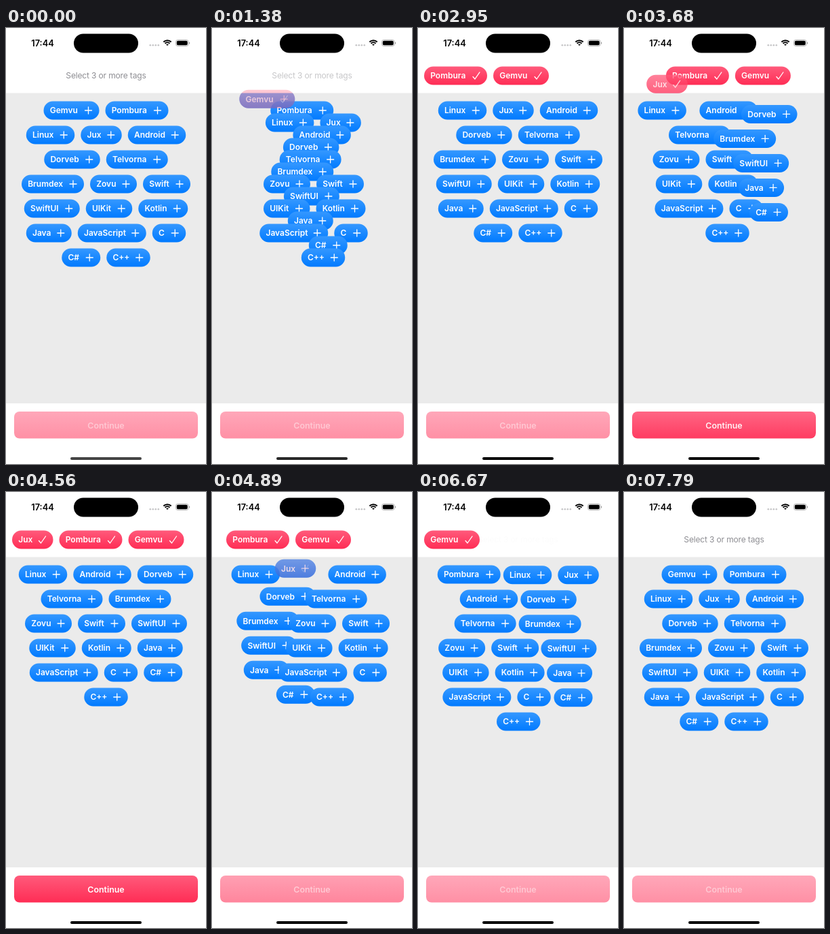
Recreate the animation shown at these times as an HTML page with a canvas. Size 295x640 px, loop 9.25 s.

```html
<!DOCTYPE html>
<html lang="en">
<head>
<meta charset="utf-8">
<title>Tag picker</title>
<style>
  html, body { margin: 0; width: 100%; height: 100%; overflow: hidden; background: #fff; }
  canvas { display: block; width: 295px; height: 640px; }
</style>
</head>
<body>
<canvas id="stage"></canvas>
<script>
const W = 295, H = 640, LOOP = 9250, GAP = 9, CHIP_H = 27, ROW_MAX = 260;
const FONT = 'Inter, "Liberation Sans", sans-serif';
const BLUE = ['#3598ff', '#007aff'], PINK = ['#ff5a7b', '#ff2d55'];

const canvas = document.getElementById('stage');
const dpr = window.devicePixelRatio || 1;
canvas.width = W * dpr;
canvas.height = H * dpr;
const ctx = canvas.getContext('2d');
ctx.scale(dpr, dpr);

const tags = [
  ['Gemvu', 82], ['Pombura', 93], ['Linux', 71.5], ['Jux', 60.5], ['Android', 85.5],
  ['Dorveb', 82.5], ['Telvorna', 91], ['Brumdex', 92], ['Zovu', 69], ['Swift', 70],
  ['SwiftUI', 82], ['UIKit', 68.5], ['Kotlin', 73], ['Java', 67], ['JavaScript', 101],
  ['C', 49.5], ['C#', 57], ['C++', 64.5]
].map(([name, w]) => ({ name, w }));

// Each step: start time and the picked tags, newest first
const steps = [
  [-LOOP, []], [1258, [0]], [2101, [1, 0]], [3455, [3, 1, 0]],
  [4640, [1, 0]], [5700, [0]], [6653, []]
].map(([at, picked]) => ({ at, picked, spots: layout(picked) }));

function layout(picked) {
  const spots = [];
  let x = GAP;
  for (const i of picked) {
    spots[i] = { x, y: 70, on: true };
    x += tags[i].w + GAP;
  }
  const rows = [];
  let width = Infinity;
  tags.forEach((tag, i) => {
    if (picked.includes(i)) return;
    if (width + GAP + tag.w > ROW_MAX) {
      rows.push([]);
      width = -GAP;
    }
    rows[rows.length - 1].push(i);
    width += GAP + tag.w;
  });
  rows.forEach((row, r) => {
    const total = row.reduce((sum, i) => sum + tags[i].w + GAP, -GAP);
    let left = (W - total) / 2;
    for (const i of row) {
      spots[i] = { x: left, y: 121 + 36 * r, on: false };
      left += tags[i].w + GAP;
    }
  });
  return spots;
}

// Slightly bouncy spring from 0 to 1
function spring(ms) {
  if (ms <= 0) return 0;
  const t = ms / 1000, zeta = 0.85, w = 2 * Math.PI / 0.5;
  const wd = w * Math.sqrt(1 - zeta * zeta);
  return 1 - Math.exp(-zeta * w * t) * (Math.cos(wd * t) + zeta * w / wd * Math.sin(wd * t));
}

const clamp = v => Math.max(0, Math.min(1, v));
const mix = (a, b, p) => a + (b - a) * p;

function box(x, y, w, h, r, fill) {
  ctx.beginPath();
  ctx.roundRect(x, y, w, h, r);
  ctx.fillStyle = fill;
  ctx.fill();
}

function shade(y, h, [top, bottom]) {
  const g = ctx.createLinearGradient(0, y, 0, y + h);
  g.addColorStop(0, top);
  g.addColorStop(1, bottom);
  return g;
}

function label(text, x, y, size, weight, color, align = 'left', spacing = 0) {
  ctx.font = `${weight} ${size}px ${FONT}`;
  ctx.letterSpacing = spacing + 'px';
  ctx.textAlign = align;
  ctx.fillStyle = color;
  ctx.fillText(text, x, y + size * 0.365);
}

function line(points, width) {
  ctx.beginPath();
  for (const [x, y] of points) ctx.lineTo(x, y);
  ctx.lineWidth = width;
  ctx.stroke();
}

function chip(tag, x, y, picked, alpha) {
  if (alpha <= 0) return;
  const top = y - CHIP_H / 2, ix = x + tag.w - 16;
  ctx.globalAlpha = alpha;
  box(x, top, tag.w, CHIP_H, CHIP_H / 2, shade(top, CHIP_H, picked ? PINK : BLUE));
  label(tag.name, x + 9.2, y, 12, 600, '#fff');
  ctx.strokeStyle = '#fff';
  ctx.lineCap = ctx.lineJoin = 'round';
  if (picked) {
    line([[ix - 5, y + 1.5], [ix - 2, y + 5], [ix + 5, y - 5]], 1.3);
  } else {
    line([[ix - 5, y], [ix + 5, y]], 1.3);
    line([[ix, y - 5], [ix, y + 5]], 1.3);
  }
  ctx.globalAlpha = 1;
}

function statusBar() {
  label('17:44', 54, 22, 12.8, 600, '#000', 'center');
  box(100, 8.5, 95, 28, 14, '#000');
  for (let i = 0; i < 4; i++) box(211.5 + 4 * i, 24, 2.6, 2.6, 1.3, '#c4c4c6');
  ctx.strokeStyle = '#000';
  ctx.lineCap = 'butt';
  ctx.lineWidth = 2;
  for (const r of [8, 4.9, 1.6]) {
    ctx.beginPath();
    ctx.arc(238, 26.2, r, -Math.PI * 0.75, -Math.PI * 0.25);
    ctx.stroke();
  }
  ctx.beginPath();
  ctx.roundRect(250.5, 17.5, 18.5, 9, 2.8);
  ctx.lineWidth = 0.8;
  ctx.strokeStyle = '#a0a0a0';
  ctx.stroke();
  box(251.8, 18.8, 15.9, 6.4, 1.7, '#000');
  box(270, 20.4, 1.1, 3.2, 0.6, '#a0a0a0');
}

function draw(now) {
  const t = now % LOOP;
  const n = steps.findLastIndex(s => s.at <= t);
  const cur = steps[n], prev = steps[Math.max(0, n - 1)];
  const elapsed = t - cur.at;
  const p = spring(elapsed), late = spring(elapsed - 35);

  const chips = tags.map((tag, i) => {
    const a = prev.spots[i], b = cur.spots[i];
    const k = a.on || b.on ? late : p;
    return { tag, x: mix(a.x, b.x, k), y: mix(a.y, b.y, k), pink: clamp(mix(+a.on, +b.on, k)) };
  });

  ctx.fillStyle = '#fff';
  ctx.fillRect(0, 0, W, H);
  ctx.fillStyle = '#ebebeb';
  ctx.fillRect(0, 95.5, W, 455.5);

  ctx.save();
  ctx.beginPath();
  ctx.rect(0, 95.5, W, 455.5);
  ctx.clip();
  for (const c of chips) chip(c.tag, c.x, c.y, false, 1 - c.pink);
  ctx.restore();

  const empty = s => +(s.picked.length === 0);
  ctx.globalAlpha = clamp(mix(empty(prev), empty(cur), p));
  label('Select 3 or more tags', W / 2, 70, 12, 400, '#8e8e93', 'center', -0.15);
  ctx.globalAlpha = 1;
  for (const c of chips) chip(c.tag, c.x, c.y, true, c.pink);

  const ready = s => +(s.picked.length >= 3);
  const on = clamp(mix(ready(prev), ready(cur), p));
  ctx.globalAlpha = mix(0.53, 1, on);
  box(12, 563, 271, 39.5, 8, shade(563, 39.5, PINK));
  ctx.globalAlpha = mix(0.45, 1, on);
  label('Continue', W / 2, 583, 12.4, 600, '#fff', 'center');
  ctx.globalAlpha = 1;

  statusBar();
  const grey = Math.round(68 * (1 - clamp((t - 1258) / 300)));
  box(95, 630, 105, 4, 2, `rgb(${grey},${grey},${grey})`);
  requestAnimationFrame(draw);
}
requestAnimationFrame(draw);
</script>
</body>
</html>
```
